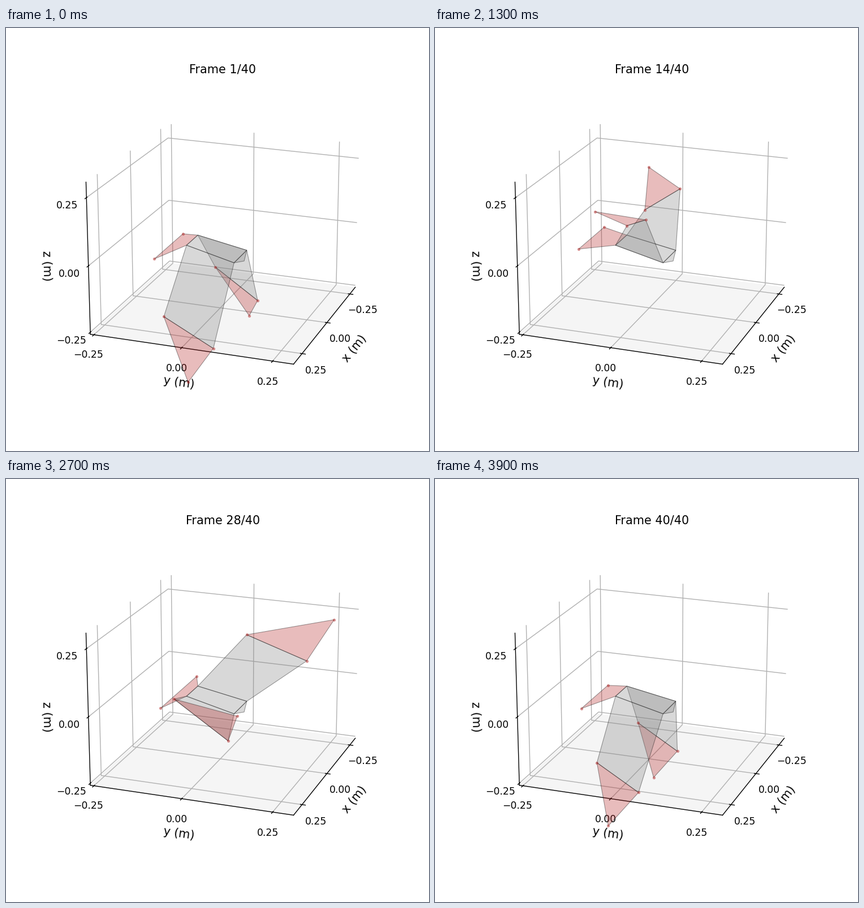
Animation, 748 px wide and 748 px high, one loop 4000 ms. Source, as a matplotlib script:

```python
import numpy as np
import matplotlib.pyplot as plt
from matplotlib.animation import FuncAnimation
from mpl_toolkits.mplot3d.art3d import Poly3DCollection

SIZE, INCHES = 748, 6
FRAMES, INTERVAL = 40, 100
BEAT = 37  # frames per wing beat

GRAY = (0.5, 0.5, 0.5, 0.3)
RED = (0.7, 0.13, 0.13, 0.3)
EDGE = (0, 0, 0, 0.4)

# Fixed body points in metres; x is the half width
TAIL_ROOT = (0.0486, -0.0815, -0.008)
SHOULDER = (0.0583, 0.0584, -0.0474)
BEAK = (0, 0.069, -0.063)


def wave(angle, mean, amp, peak, amp2=0, peak2=0):
    """Mean plus a first and second harmonic; peaks in degrees."""
    return (mean + amp * np.cos(angle - np.radians(peak))
            + amp2 * np.cos(2 * angle - np.radians(peak2)))


def inner_wrist(a):
    return (wave(a, 0.190, 0.130, -66, 0.022, 206),
            wave(a, -0.047, 0.045, 205),
            wave(a, 0.006, 0.201, 195, 0.019, 180))


def outer_wrist(a):
    return (wave(a, 0.235, 0.107, -89, 0.032, 176),
            wave(a, 0.075, 0.070, 246),
            wave(a, -0.035, 0.259, 178, 0.026, 227))


def wing_tip(a):
    return (wave(a, 0.300, 0.152, -86, 0.060, 237),
            wave(a, 0.033, 0.164, 258),
            wave(a, -0.012, 0.373, 192, 0.054, 224))


def tail_tip(a):
    return (wave(a, 0.125, 0.028, 260),
            wave(a, -0.148, 0.028, 265),
            wave(a, -0.023, 0.020, 190))


def both_sides(point):
    x, y, z = point
    return (x, y, z), (-x, y, z)


def bird(n):
    """Panels and joint markers for one frame."""
    a = 2 * np.pi * n / BEAT
    roots, shoulders = both_sides(TAIL_ROOT), both_sides(SHOULDER)
    inner, outer = both_sides(inner_wrist(a)), both_sides(outer_wrist(a))
    tips, fan = both_sides(wing_tip(a)), both_sides(tail_tip(a))

    panels = [
        [roots[0], shoulders[0], shoulders[1], roots[1]],
        [shoulders[0], BEAK, shoulders[1]],
        [roots[0], roots[1], fan[1], fan[0]],
    ]
    for side in (0, 1):
        panels.append([roots[side], shoulders[side], outer[side], inner[side]])
        panels.append([inner[side], outer[side], tips[side]])
    return panels, np.array(inner + outer + tips + fan)


fig = plt.figure(figsize=(INCHES, INCHES), dpi=SIZE / INCHES, facecolor="white")
ax = fig.add_subplot(projection="3d")
ax.view_init(elev=20, azim=20)

panels, joints = bird(0)
skin = Poly3DCollection(panels, facecolors=[GRAY, GRAY, RED] + [GRAY, RED] * 2,
                        edgecolors=[EDGE] * len(panels), linewidths=0.6)
ax.add_collection3d(skin)
dots, = ax.plot(*joints.T, "o", ms=3, mew=0, color="firebrick", alpha=0.5,
                zorder=20)

ax.set(xlim=(-0.3125, 0.3305), ylim=(-0.2603, 0.3063), zlim=(-0.2578, 0.306))
for name, axis in zip("xyz", (ax.xaxis, ax.yaxis, ax.zaxis)):
    axis.set_ticks([-0.25, 0, 0.25])
    axis.set_label_text(f"{name} (m)", fontsize=12)
for wall in (ax.xaxis, ax.yaxis):
    wall.set_pane_color((1, 1, 1, 0))
title = ax.set_title("")


def update(n):
    panels, joints = bird(n)
    skin.set_verts(panels)
    dots.set_data_3d(*joints.T)
    title.set_text(f"Frame {n + 1}/{FRAMES}")
    return skin, dots, title


anim = FuncAnimation(fig, update, frames=FRAMES, interval=INTERVAL, repeat=True)
plt.show()
```
